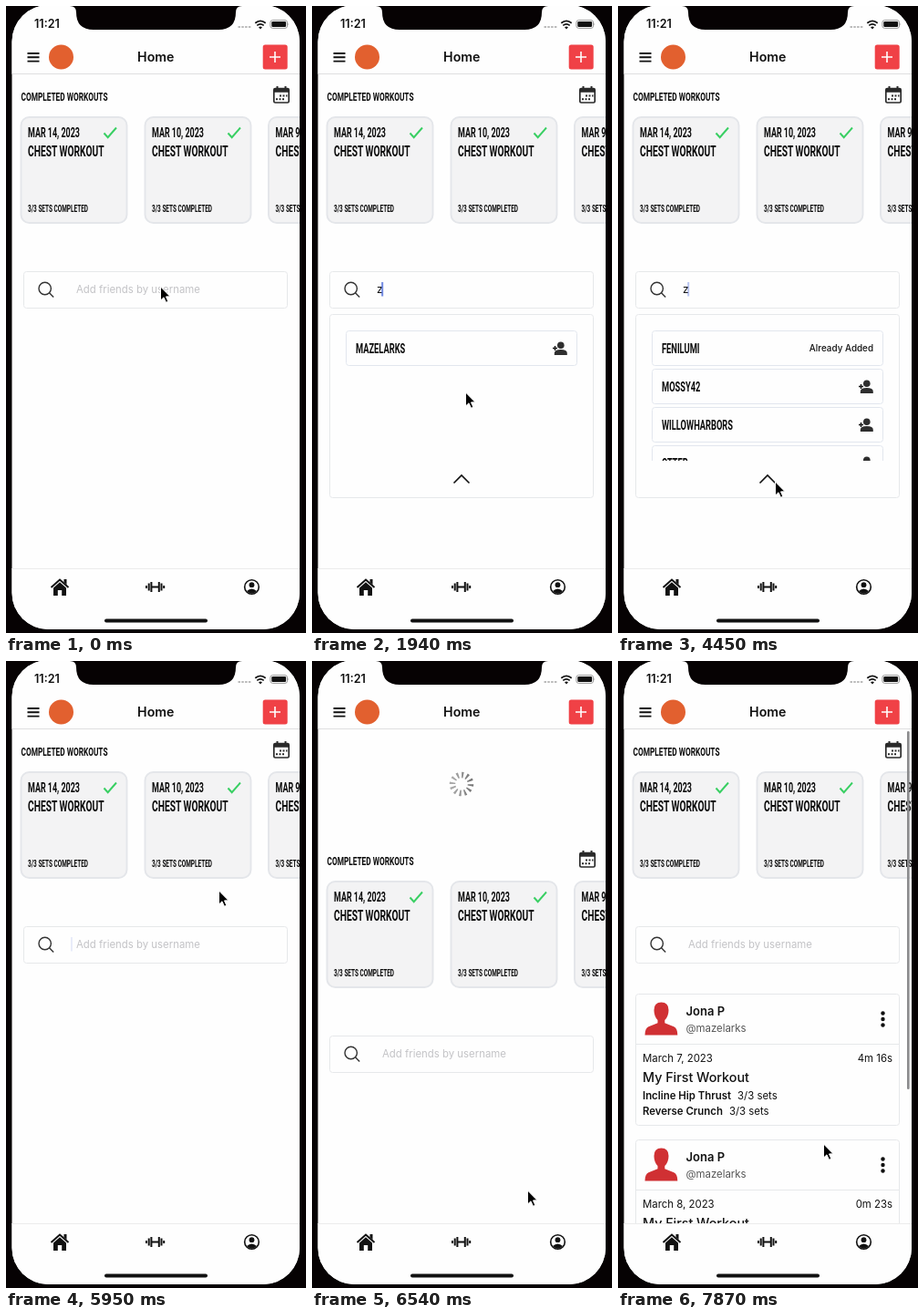
An HTML page for the animation above (8000 ms loop, 329 by 688 pixels).

```html
<!DOCTYPE html>
<html lang="en">
<head>
<meta charset="utf-8">
<title>Workout app</title>
<style>
html, body { margin: 0; width: 100%; height: 100%; overflow: hidden; background: #060203; }
svg { display: block; width: 100%; height: 100%; font: 11.4px Inter, sans-serif; fill: #111; }
.condensed {
  font-family: Roboto, sans-serif; font-weight: 700; fill: #0c0c0c;
  transform-box: fill-box; transform-origin: 0 0; transform: scaleX(.62);
}
.line { fill: none; stroke: #111; }
.box { fill: #fefefe; stroke: #e6e8ea; }
.semi { font-weight: 600; }
.end { text-anchor: end; }

/* Keyframes are paused and sought by the script through --seek. */
.anim { animation: 8s linear var(--seek, 0ms) infinite paused; }
.hard { animation-timing-function: step-end; }
.scroll { animation-name: scroll; }
.spinner { animation-name: spinner; }
.turn { animation-name: turn; animation-duration: 1s; animation-timing-function: steps(12); }
.pointer { animation-name: pointer; }
.caret { animation-name: blink; }
.caret-x { animation-name: caret-x; }
.panel { animation-name: panel; }
.typed { animation-name: typed; }
.hint { animation-name: hint; }
.all { animation-name: all; }
.match { animation-name: match; }
.loaded { animation-name: loaded; }

@keyframes panel { 0%, 57.3%, 100% { opacity: 0 } 5.5% { opacity: 1 } }
@keyframes typed { 0%, 57.3%, 100% { opacity: 0 } 22.2% { opacity: 1 } }
@keyframes hint { 0%, 57.3%, 100% { opacity: 1 } 22.2% { opacity: 0 } }
@keyframes all { 0%, 40.5%, 100% { opacity: 1 } 24% { opacity: 0 } }
@keyframes match { 0%, 40.5%, 100% { opacity: 0 } 24% { opacity: 1 } }
@keyframes loaded { 0% { opacity: 0 } 87%, 100% { opacity: 1 } }
@keyframes caret-x { 0%, 57.3%, 100% { translate: 0 } 22.2% { translate: 5.2px } }
@keyframes blink {
  0%, 5.4%, 13%, 17%, 32%, 35%, 45%, 48%, 57%, 61%, 75.5%, 88%, 97%, 100% { opacity: 0 }
  5.5%, 11%, 19%, 29%, 37%, 43%, 50%, 54%, 63%, 71%, 89%, 94.5% { opacity: 1 }
  55.7% { opacity: .5 }
  74.3% { opacity: .15 }
}
@keyframes scroll {
  0%, 74.3% { translate: 0 0 }
  76.16% { translate: 0 46px }
  78% { translate: 0 134.5px }
  79.87% { translate: 0 163px }
  81.73% { translate: 0 120px }
  83.6% { translate: 0 54px }
  85.4% { translate: 0 13.5px }
  87.3% { translate: 0 1px }
  89.1%, 100% { translate: 0 0 }
}
@keyframes spinner {
  0%, 74.3% { translate: 0 0; scale: 0 }
  76.16% { translate: 0 23px; scale: .5 }
  78% { translate: 0 67px; scale: 1 }
  79.87% { translate: 0 81px; scale: 1 }
  81.73% { translate: 0 60px; scale: 1 }
  83.6% { translate: 0 27px; scale: .9 }
  85.4% { translate: 0 6.5px; scale: .32 }
  87.3%, 100% { translate: 0 0; scale: 0 }
}
@keyframes turn { to { rotate: 360deg } }
@keyframes pointer {
  0%, 7.4% { translate: 169.5px 308px; animation-timing-function: ease-in-out }
  18.6%, 26% { translate: 168.5px 424px; animation-timing-function: ease-in-out }
  37.2%, 40.8% { translate: 266px 372px; animation-timing-function: ease-in-out }
  53.9% { translate: 170px 529px }
  55.7%, 59.4% { translate: 172.5px 522px; animation-timing-function: ease-in }
  66.9% { translate: 218px 335px }
  70.6% { translate: 233px 258px }
  74.3% { translate: 233.5px 252px }
  76.16% { translate: 234px 330px }
  78% { translate: 235.5px 495px }
  79.87% { translate: 236.5px 572px }
  81.73%, 91% { translate: 236.5px 581px; animation-timing-function: ease-in-out }
  98.4%, 100% { translate: 225.5px 530px }
}
</style>
</head>
<body>
<svg viewBox="0 0 329 688">
  <defs>
    <clipPath id="screen"><rect x="6.5" y="-1" width="315.5" height="685" rx="40"/></clipPath>
    <clipPath id="list"><rect x="30" y="350" width="270" height="149"/></clipPath>
    <linearGradient id="fade"><stop stop-color="#777"/><stop offset="1" stop-color="#aaa"/></linearGradient>

    <g id="workout">
      <rect x="16.5" y="122" width="116" height="116" rx="9" fill="#f3f3f4" stroke="#e4e6ea" stroke-width="2"/>
      <path class="line" d="M107.5 139.5l4.2 4.7L121 133.5" style="stroke:#39cf63" stroke-width="2"/>
      <text class="condensed" x="24" y="165.3" font-size="16.5">CHEST WORKOUT</text>
      <text class="condensed" x="24" y="226.3" font-size="10.4">3/3 SETS COMPLETED</text>
    </g>
    <rect id="row" class="box" x="37.5" y="356.5" width="253" height="38" rx="3" style="stroke:#e2e6ee"/>
    <g id="add" fill="#2e2e2e">
      <circle cx="272.8" cy="372.3" r="3.8"/>
      <path d="M265.8 383v-2q0-4 7-4t7 4v2z"/>
      <path class="line" d="M264 375.5h5M266.5 373v5" stroke-width="1.4"/>
    </g>
    <g id="post">
      <rect class="box" x="19.5" y="365.5" width="289" height="144" rx="3"/>
      <path class="line" d="M20 420.5h288" style="stroke:#e6e8ea"/>
      <path fill="#d03033" d="M39.5 383q0-8.500 8-8.500t8 8.500q0 7-4.200 11v3.200l10 4q4 2 4 9.300H29.500q0-7.300 4-9.300l10-4V394q-4-4-4-11z"/>
      <text class="semi" x="74.500" y="389" font-size="13">Jona P</text>
      <text x="74.500" y="407" fill="#555">@mazelarks</text>
      <circle cx="290.500" cy="386.500" r="2.200"/>
      <circle cx="290.500" cy="393" r="2.200"/>
      <circle cx="290.500" cy="399.500" r="2.200"/>
      <text x="27" y="461.500" font-size="14.300" font-weight="500">My First Workout</text>
      <text x="27" y="480.500"><tspan class="semi">Incline Hip Thrust</tspan><tspan dx="7">3/3 sets</tspan></text>
      <text x="27" y="497.500"><tspan class="semi">Reverse Crunch</tspan><tspan dx="7">3/3 sets</tspan></text>
    </g>
  </defs>

  <g clip-path="url(#screen)">
    <rect width="329" height="688" fill="#fefefe"/>

    <g transform="translate(164 75)"><g class="anim spinner"><g class="anim turn">
      <circle r="10" fill="none" stroke="url(#fade)" stroke-width="6.500" stroke-dasharray="2 3.236"/>
    </g></g></g>

    <g class="anim scroll">
      <text class="condensed" x="16.500" y="104" font-size="13.400">COMPLETED WORKOUTS</text>
      <g class="line" style="stroke:#2a2a2a" stroke-width="1.700">
        <rect x="293.800" y="90.500" width="16.400" height="15.500" rx="1.500"/>
        <path d="M294 92.800h16" stroke-width="4"/>
        <path d="M297.500 88v4M306.500 88v4" stroke-width="2"/>
        <path d="M300 98.500h8.500M296 102.300h9" stroke-width="2" stroke-dasharray="2 1.500"/>
      </g>

      <use href="#workout"/>
      <use href="#workout" x="136"/>
      <use href="#workout" x="271.500"/>
      <g font-size="14.400">
        <text class="condensed" x="24" y="144">MAR 14, 2023</text>
        <text class="condensed" x="160" y="144">MAR 10, 2023</text>
        <text class="condensed" x="295.500" y="144">MAR 9, 2023</text>
      </g>

      <rect class="box" x="19.500" y="291.500" width="289" height="40" rx="3"/>
      <g class="line" style="stroke:#333" stroke-width="1.400">
        <circle cx="42.700" cy="310" r="6.700"/>
        <path d="M47.500 314.800l4.700 4.700"/>
      </g>
      <text class="anim hard hint" x="77" y="315" fill="#c3c3c6">Add friends by username</text>
      <text class="anim hard typed" x="71" y="315" font-size="12">z</text>
      <g class="anim hard caret-x">
        <rect class="anim caret" x="71.200" y="303" width="1.500" height="15.500" fill="#4263d8"/>
      </g>

      <g class="anim hard panel">
        <rect class="box" x="19.500" y="338.500" width="289" height="201" rx="3"/>
        <path class="line" d="M155.500 523.500l8.500-8.500 8.500 8.500" stroke-width="1.600"/>
        <g clip-path="url(#list)" font-size="15">
          <g class="anim hard all">
            <use href="#row"/>
            <text class="condensed" x="48" y="380.800">FENILUMI</text>
            <text class="end" x="280" y="379" font-size="9.900" font-weight="500">Already Added</text>
            <use href="#row" y="42"/><use href="#add" y="42"/>
            <text class="condensed" x="48" y="422.800">MOSSY42</text>
            <use href="#row" y="84"/><use href="#add" y="84"/>
            <text class="condensed" x="48" y="464.800">WILLOWHARBORS</text>
            <use href="#row" y="126"/><use href="#add" y="126"/>
            <text class="condensed" x="48" y="506.800">OTTER</text>
          </g>
          <g class="anim hard match">
            <use href="#row"/><use href="#add"/>
            <text class="condensed" x="48" y="380.800">MAZELARKS</text>
          </g>
        </g>
      </g>

      <g class="anim hard loaded">
        <use href="#post"/>
        <text x="27" y="440">March 7, 2023</text>
        <text class="end" x="301" y="440">4m 16s</text>
        <use href="#post" y="160"/>
        <text x="27" y="600">March 8, 2023</text>
        <text class="end" x="301" y="600">0m 23s</text>
      </g>
    </g>
    <rect class="anim hard loaded" x="317" y="77" width="2.600" height="393" rx="1.300" fill="#8b8b8d"/>

    <!-- Header -->
    <rect width="329" height="74" fill="#fefefe"/>
    <path class="line" d="M0 74.500h329" style="stroke:#dfdfe0"/>
    <path fill="#060203" d="M70 0q7 0 7 7q0 19 19 19H233q19 0 19-19q0-7 7-7z"/>
    <text class="semi" x="31" y="24.300" font-size="12.600">11:21</text>
    <path class="line" d="M254.500 23h14" style="stroke:#bbb" stroke-width="2.200" stroke-dasharray="2.500 1.300"/>
    <path class="line" d="M273.300 18.800q5.700-4.800 11.400 0M275.300 21.400q3.700-3 7.400 0" stroke-width="1.800"/>
    <path d="M277 23.300q2-1.600 4 0l-2 2.200z"/>
    <rect class="line" x="289.900" y="15.600" width="18.600" height="8.800" rx="2.500" style="stroke:#999"/>
    <rect x="291.300" y="17" width="15.800" height="6" rx="1.300"/>
    <path d="M309.500 18.500q1.500 1.500 0 3z" fill="#999"/>

    <path class="line" d="M23.500 52h13M23.500 56.300h13M23.500 60.600h13" stroke-width="1.900"/>
    <circle cx="60.500" cy="56" r="13.500" fill="#e2602f"/>
    <text class="semi" x="164.300" y="61" font-size="14.200" text-anchor="middle">Home</text>
    <rect x="281.700" y="42.500" width="27" height="27" rx="2.500" fill="#f04146"/>
    <path class="line" d="M289 56h12M295 50v12" style="stroke:#fff" stroke-width="1.600"/>

    <!-- Tab bar -->
    <rect y="617" width="329" height="71" fill="#fefefe"/>
    <path class="line" d="M0 617.500h329" style="stroke:#ececec"/>
    <path class="line" d="M49.500 638l9.500-8.500 9.500 8.500" stroke-width="2"/>
    <path d="M52 638.500l7-6.200 7 6.200V647h-4.800v-6h-4.400v6H52zM63.500 629h3v6l-3-2.700z"/>
    <path class="line" d="M154 636v3M156.700 633.500v8M159.400 632v11M159 637.500h9M167.800 632v11M170.500 633.500v8M173.200 636v3" stroke-width="2"/>
    <circle class="line" cx="269.500" cy="637.500" r="7.800" stroke-width="1.600"/>
    <circle cx="269.500" cy="635.200" r="2.900"/>
    <path d="M264 642q5.500-5 11 0q-5.500 5.500-11 0z"/>
    <rect x="108" y="672.500" width="113" height="4" rx="2"/>
  </g>

  <g class="anim pointer">
    <path d="M0 0V15l3.500-3.200L6 17.300l2.400-1L6 10.900l4.600-.1z" fill="#000" stroke="#fff" stroke-width="1"/>
  </g>
</svg>
<script>
// The picture advances in ticks, like a low-rate screen recording.
const LOOP = 8000, TICK = 148.6, LEAD = 15;
const start = performance.now();

function play() {
  const time = (performance.now() - start) % LOOP;
  const tick = Math.min(53, Math.floor((time + LEAD) / TICK));
  document.documentElement.style.setProperty('--seek', `${-tick * TICK}ms`);
  requestAnimationFrame(play);
}
play();
</script>
</body>
</html>
```
